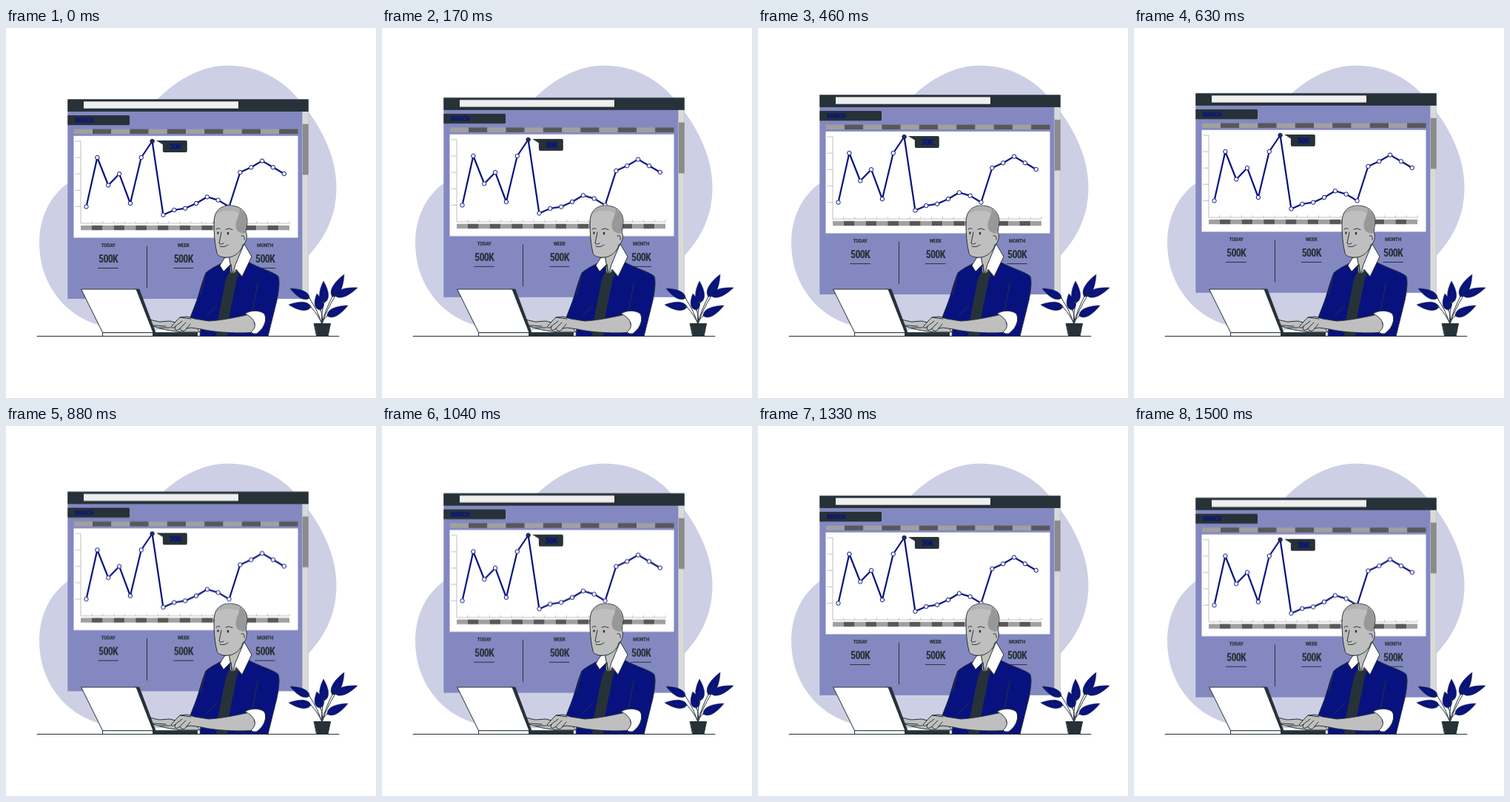
An HTML page that plays this animation: 500 by 500 pixels, repeating every 1540 ms.

```html
<!DOCTYPE html>
<html lang="en">
<head>
<meta charset="utf-8">
<title>Monthly dashboard</title>
<style>
  html, body { margin: 0; width: 100%; height: 100%; overflow: hidden; background: #fff; }
  svg { display: block; width: 100%; height: 100%; }
  text { font: 600 14px "Roboto Condensed", "Liberation Sans Narrow", "Open Sans", "Noto Sans", sans-serif; font-stretch: 75%; text-anchor: middle; fill: #263238; letter-spacing: -.8px; }
  .small { font-size: 7.6px; letter-spacing: -.35px; }
  .navy { fill: #08127f; }
  .dark { fill: #263238; }
  .skin { fill: #bfbfbf; }
  .white { fill: #fff; }
  .ink { stroke: #263238; stroke-width: 1; stroke-linejoin: round; stroke-linecap: round; }
  .thin { stroke-width: .5; }
  .line { fill: none; }
  #window { animation: bob 1540ms infinite; }
  /* 37 steps per loop: 17 up, one held, 18 down, one held */
  @keyframes bob {
    0% { transform: translateY(0); animation-timing-function: steps(17); }
    45.946% { transform: translateY(-9.2px); animation-timing-function: steps(1); }
    48.649% { transform: translateY(-9.2px); animation-timing-function: steps(18); }
    97.297% { transform: translateY(.65px); animation-timing-function: steps(1); }
    100% { transform: translateY(0); }
  }
</style>
</head>
<body>
<svg viewBox="0 0 500 500">
  <path fill="#cdcfe5" d="M300 50.7C343 50.7 375 71 396 97C427 134 446.5 174 446.5 215C446.5 260 427.5 290 397 320C346 367 280 398 215 407C182 412 150 409 128 402C78 389 45 344 45 291C45 252 62 223 90 205C130 175 165 130 205 96C232 69 265 50.7 300 50.7Z"/>

  <g id="window">
    <rect x="83.3" y="96.35" width="325.4" height="269.6" fill="#8488c0"/>
    <rect x="400.4" y="112.8" width="8.3" height="253.1" fill="#d9d9d9"/>
    <rect x="400.8" y="129.8" width="7.9" height="68.6" fill="#8a8a8a"/>
    <rect class="dark" x="83.3" y="96.35" width="325.4" height="16.6"/>
    <rect x="105" y="99.3" width="209" height="9.4" fill="#efefef"/>
    <path class="dark" d="M83.3 118H165.5Q167 118 167 119.5V129.8Q167 131.3 165.5 131.3H83.3Z"/>
    <text class="navy small" x="105.8" y="127.7" style="font-size:8.6px">MARCH</text>
    <g id="topStrip"></g>
    <rect class="white" x="91.5" y="145.8" width="303" height="137.6"/>
    <path id="axis" class="line" stroke="#b8b8b8" stroke-width=".9"/>
    <g id="lowStrip"></g>
    <polyline id="plot" class="line" stroke="#08127f" stroke-width="2.2" stroke-linejoin="round"/>
    <g id="dots" stroke="#08127f"></g>
    <path class="dark" d="M203 152H243Q244.8 152 244.8 153.8V166Q244.8 168 243 168H213.7Q211.9 168 211.9 166V157.5Z"/>
    <text class="navy" x="228.4" y="164.4" style="font-size:11.5px">30K</text>
    <g id="totals"></g>
    <path class="ink line" d="M190.5 295V351"/>
  </g>

  <path class="ink line" d="M42 416.5H450"/>

  <g id="plant"></g>

  <g id="man" class="ink">
    <path class="navy" d="M295 316C285 321 275 326 270 331C265 342 261 360 256 373L249 391C250 397 254 402 263 406L262 416.5H354L366 368C369 354 370 342 368 336C365 331 346 326 329 317Z"/>
    <path class="dark" stroke="none" d="M302 328L297 340L287 390L284 416.5H299L302 388L312 338L316 328Z"/>
    <path class="line" d="M270 331L263 360M340 345L333 384M285 375L270 389"/>
    <path class="skin" d="M301 306L303 330Q307 335 311 329L322 303V286Z"/>
    <path class="white" d="M301 309L295 311L289 321L294 329L304 319L306 334Z"/>
    <path class="white" d="M322 292L332 309L319 336L311 326L306 334L310 320Z"/>
    <path class="skin" d="M281 263C281 248 289 240 302 240C317 240 326 249 326 262L324 276C327 280 325 291 320 293C318 302 309 310 299 310C292 310.5 286 308 285 304C282 292 281 278 281 263Z"/>
    <path fill="#b0b0b0" stroke="none" d="M284 251C288 243 295 240.5 302 240.5C309 240.5 314 243 317 246L316 250C305 246 294 246 284 251Z"/>
    <path fill="#989898" stroke="none" d="M316 245C323 249 325.5 256 325.5 263L323.5 276Q321 279 318 277Q312 275 311 271C309 260 315 256 316 245Z"/>
    <path class="line" d="M284 272Q286 269.5 289 271M297 272Q301 269.5 306 272.5M291 276L288 291Q290 293 294 291M289 295Q295 297 300 293M318 281Q323 279 322 286"/>
    <g class="dark" stroke="none">
      <ellipse cx="286.5" cy="277" rx="1.2" ry="1.8"/>
      <ellipse cx="300" cy="277.5" rx="1.3" ry="1.9"/>
    </g>
    <path class="skin" d="M194 394L207 397L221 396L234 399L256 402L262 411H238C221 409 209 407 199 403Z"/>
    <path class="line" d="M199 402L216 403M207 405L222 405"/>
  </g>

  <g id="laptop" class="ink">
    <path class="dark" d="M174 353H180L202 411.7H196Z"/>
    <path class="white" d="M102 353H176L199 411.7H131Z"/>
    <path class="white" d="M131 411.7H199V416.5H131Z"/>
    <path class="dark" d="M199 411.7H258.5V416.5H199Z"/>
  </g>

  <g class="ink">
    <path class="skin" d="M333 386C312 391 291 395 274 396L255 393L245 390L235 391L229 397L223 404Q225 407 229 403L228 407Q231 410 235 406L237 409Q241 411 244 406L250 405L264 407C285 412 318 413 338 411Z"/>
    <path class="line" d="M229 403L238 396M235 406L243 398M244 406L249 400M235 391L250 393"/>
    <path class="white" d="M323 386C331 381 342 381 349 386C353 393 350 405 339 413Q333 414 331 411C340 404 338 393 323 386Z"/>
  </g>
</svg>
<script>
  const $ = id => document.getElementById(id);
  const add = (id, markup) => $(id).insertAdjacentHTML('beforeend', markup);

  function strip(id, x, y, width, count) {
    const w = width / count;
    for (let i = 0; i < count; i++)
      add(id, `<rect x="${x + i * w}" y="${y}" width="${w}" height="6.4" fill="${i % 2 ? '#585858' : '#a0a0a0'}"/>`);
  }
  strip('topStrip', 91.8, 136.6, 302.6, 12);
  strip('lowStrip', 101, 266.8, 282, 19);

  const step = 14.85;
  const heights = [241.5, 175, 212.5, 197.2, 237, 175, 153, 252.5, 246, 243.7,
    237, 228.3, 232.6, 241.5, 195, 188.3, 179.6, 188.3, 197];
  const points = heights.map((y, i) => [108.5 + i * step, y]);
  $('plot').setAttribute('points', points.join(' '));
  points.forEach(([x, y], i) =>
    add('dots', `<circle cx="${x}" cy="${y}" r="2.7" fill="${i === 6 ? '#263238' : '#fff'}"/>`));

  let axis = 'M101 153V264H383';
  for (let i = 0; i < 5; i++) axis += `M93.5 ${153 + i * 22.1}H101`;
  for (let i = 1; i < 20; i++) axis += `M${101 + i * step} 261.3V264`;
  $('axis').setAttribute('d', axis);

  [['TODAY', 138], ['WEEK', 239.7], ['MONTH', 350]].forEach(([label, x]) => add('totals',
    `<text class="small" x="${x}" y="296.4">${label}</text>
     <text x="${x}" y="316.8">500K</text>
     <path class="ink" d="M${x - 13.3} 324.5h26.6"/>`));

  // Leaf from base to tip, with a stem running to the pot
  function leaf(bx, by, tx, ty, w) {
    const dx = tx - bx, dy = ty - by, len = Math.hypot(dx, dy);
    const at = (k, side) => `${bx + dx * k - dy / len * side} ${by + dy * k + dx / len * side}`;
    add('plant', `<path class="ink line" d="M427 400Q${(bx + 427) / 2 + (bx < 427 ? 3 : -3)} ${(by + 400) / 2} ${bx} ${by}"/>
      <path class="navy ink thin" d="M${bx} ${by}C${at(.1, w)} ${at(.5, w)} ${tx} ${ty}C${at(.5, -w)} ${at(.1, -w)} ${bx} ${by}Z"/>
      <path class="ink line thin" d="M${bx} ${by}L${at(.5, 0)}"/>`);
  }
  leaf(410, 365, 384, 352, 7);
  leaf(412, 377, 382, 374, 7.5);
  leaf(430, 371, 429, 342, 8);
  leaf(441, 363, 457, 333, 8);
  leaf(445, 362, 475, 351, 7);
  leaf(434, 389, 462, 375, 7.5);
  leaf(425, 381, 420, 359, 8);
  add('plant', '<path class="dark ink" d="M416.5 399.5H438.5L435 416.5H420Z"/>');
</script>
</body>
</html>
```
